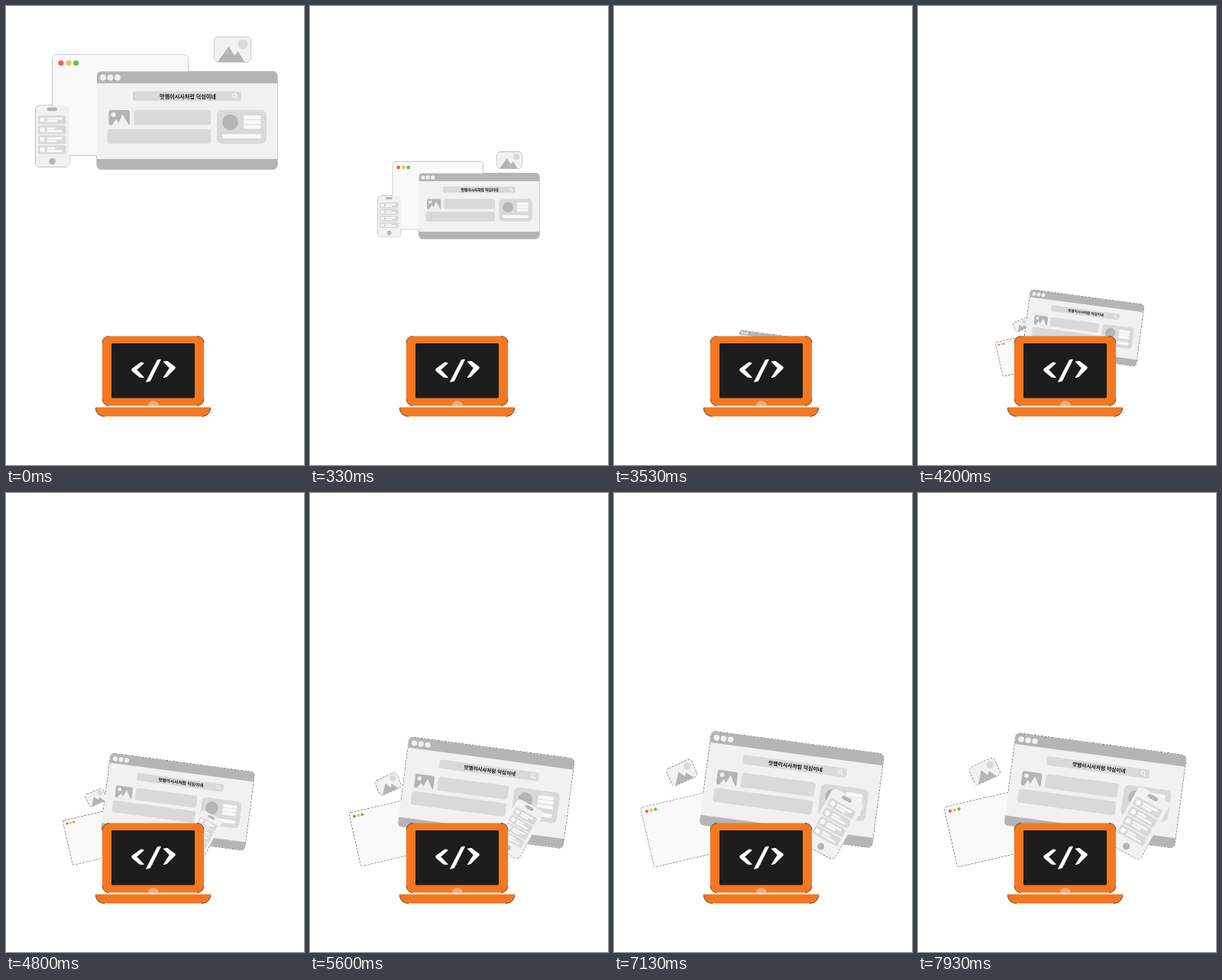
Write an HTML page that moves like this. It is 390 px wide and 600 px high and loops after 8000 ms.

```html
<!DOCTYPE html>
<html lang="ko">
<head>
<meta charset="utf-8">
<title>Laptop and windows</title>
<style>
  html, body { margin: 0; width: 100%; height: 100%; overflow: hidden; background: #fff; }
  svg { display: block; width: 100vw; height: 100vh; }
  #fringe rect, .corner { fill: none; stroke: #222; stroke-width: 1; vector-effect: non-scaling-stroke; }
  #fringe { opacity: .45; }
  #fringe.loose { opacity: .9; stroke-dasharray: 3 1.5; }
  .corner { stroke-width: .7; }
  .pale { fill: #f1f1f1; }
  .mid { fill: #d9d9d9; }
  .dark { fill: #b5b5b5; }
  .white { fill: #fafafa; }
  .query { font: 700 7.1px "Noto Sans CJK KR", "Noto Sans CJK", sans-serif; text-anchor: middle; fill: #151515; }
</style>
</head>
<body>
<svg viewBox="0 0 390 600">
  <!-- thin outlines lie below all fills, so only the joint silhouette shows -->
  <g id="fringe"></g>
  <g id="sheet">
    <rect x="61" y="64" width="177" height="131.500" rx="4" fill="#f9f9f9"/>
    <circle cx="72" cy="74.500" r="3.600" fill="#f0625b"/>
    <circle cx="82" cy="74.500" r="3.600" fill="#f5bf4f"/>
    <circle cx="91.500" cy="74.500" r="3.600" fill="#61c454"/>
  </g>
  <g id="browser">
    <rect class="pale" x="119" y="85.500" width="236" height="128" rx="6"/>
    <path class="dark" d="M119 101V91.500q0-6 6-6H349q6 0 6 6V101zM119 200H355v7.500q0 6-6 6H125q-6 0-6-6z"/>
    <g class="pale">
      <circle cx="127" cy="93.500" r="3.900"/>
      <circle cx="136.500" cy="93.500" r="3.900"/>
      <circle cx="146" cy="93.500" r="3.900"/>
    </g>
    <rect class="mid" x="166" y="111.500" width="142" height="12.500" rx="3"/>
    <g fill="none" stroke="#f8f8f8" stroke-width="1.100">
      <circle cx="299" cy="117" r="2.400"/>
      <path d="M300.800 118.800L303.300 121.500"/>
    </g>
    <text class="query" x="238" y="120.500">맛멤이시사처럼 덕심이네</text>
    <rect class="dark" x="134.500" y="136" width="27.500" height="20" rx="3"/>
    <circle class="pale" cx="140.800" cy="142" r="3"/>
    <path class="pale" d="M138.500 156L144 148L147.500 152.500L152.500 141.500L161 156z"/>
    <rect class="mid" x="167.500" y="136" width="100.500" height="19.500" rx="3"/>
    <rect class="mid" x="133" y="161" width="135" height="19" rx="3"/>
    <rect class="mid" x="276" y="136" width="65" height="44" rx="7"/>
    <circle class="dark" cx="293.500" cy="152" r="10.300"/>
    <g class="white">
      <rect x="311" y="143" width="22.500" height="5.200" rx="1.500"/>
      <rect x="311" y="149.200" width="22.500" height="5.200" rx="1.500"/>
      <rect x="311" y="155.400" width="22.500" height="5.200" rx="1.500"/>
      <rect x="283" y="167.500" width="50.500" height="5.500" rx="1.500"/>
    </g>
  </g>
  <g id="phone">
    <rect class="pale" x="38.500" y="130" width="44.500" height="80.500" rx="6"/>
    <rect class="dark" x="53.500" y="132.500" width="13.500" height="4.800" rx="2.400"/>
    <g id="rows"></g>
    <circle class="dark" cx="60.500" cy="203" r="4.300"/>
  </g>
  <g id="picture">
    <rect class="pale" x="272.500" y="40.500" width="48" height="32.500" rx="5.500"/>
    <circle class="mid" cx="310" cy="50" r="6.500"/>
    <path class="dark" d="M277 73L291.500 53L299 65L303.500 59.500L312.500 73z"/>
  </g>
  <g id="laptop">
    <rect x="126" y="431.500" width="133" height="91" rx="9" fill="#f47721"/>
    <rect x="138" y="441" width="109" height="71.500" rx="1.500" fill="#1c1c1c"/>
    <path d="M186 522.500a7 6.500 0 0 1 14 0z" fill="#f9ad7b"/>
    <path d="M117 524.500H268V526Q266 536.500 256 536.500H129Q119 536.500 117 526z" fill="#f47721"/>
    <path class="corner" d="M126 440.500a9 9 0 0 1 9-9M250 431.500a9 9 0 0 1 9 9M259 513.500a9 9 0 0 1-9 9M135 522.500a9 9 0 0 1-9-9M268 526Q266 536.500 256 536.500M129 536.500Q119 536.500 117 526"/>
    <g fill="#fff" stroke="#fff" stroke-linejoin="round">
      <path d="M177 466L165 474.500V476.500L175 485L180 485.500L170.500 475.500L180 467z" stroke-width="1.200"/>
      <path d="M198.500 463L202 462.500L188.500 489.500L184 491z" stroke-width="1.600"/>
      <path d="M206.500 465L211 464.500L221 472V473.500L210 484.500L206.500 485.500L214.500 473z" stroke-width="1.200"/>
    </g>
  </g>
</svg>
<script>
  const LOOP = 8000, RISE = 3000;
  const get = id => document.getElementById(id);

  get("rows").innerHTML = [143, 156, 169, 182].map((y, i) => `
    <rect class="mid" x="42" y="${y}" width="36.500" height="11.500" rx="2"/>
    <g class="white">
      <circle cx="47.500" cy="${y + 5.7}" r="3.100"/>
      <rect x="53.500" y="${y + 2.7}" width="${i % 2 ? 11 : 20}" height="2.600" rx="1"/>
      <rect x="53.500" y="${y + 6.3}" width="${i % 2 ? 20 : 13}" height="2.600" rx="1"/>
    </g>`).join("");

  // home: resting centre, sink: where it vanishes,
  // from + travel: path of the centre as it rises again
  const parts = [
    { id: "sheet", home: [149.5, 130], sink: [203, 484], from: [187.5, 478], travel: [-92, -40], size: .608, tilt: -13, span: 5000 },
    { id: "browser", home: [237, 149.5], sink: [190, 485], from: [185.5, 484.5], travel: [47, -97], size: .965, tilt: 7.6, span: 4000 },
    { id: "phone", home: [60.5, 170.3], sink: [190, 484], from: [193, 474.6], travel: [97, -43.6], size: 1.07, tilt: 29, span: 6000 },
    { id: "picture", home: [296.5, 56.7], sink: [190, 491], from: [186, 473.6], travel: [-99, -110], size: .75, tilt: -24, span: 5600 }
  ];
  const fringe = get("fringe");
  parts.forEach(p => {
    const art = get(p.id);
    const outline = art.querySelector("rect").cloneNode();
    fringe.append(outline);
    p.nodes = [art, outline];
  });

  const easeOut = u => 1 - (1 - u) ** 3;

  // Out and back again along the same curve
  function riseAt(t, span) {
    const u = Math.max(0, t - RISE) / span;
    return easeOut(u > 1 ? 2 - u : u);
  }

  function place(p, t) {
    const sinking = t < RISE;
    const k = sinking ? Math.max(0, 1 - t / 1000) : riseAt(t, p.span);
    const scale = sinking ? k : p.size * k;
    const at = i => sinking
      ? p.sink[i] + (p.home[i] - p.sink[i]) * k
      : p.from[i] + p.travel[i] * k;
    const move = `translate(${at(0)} ${at(1)}) rotate(${sinking ? 0 : p.tilt}) scale(${scale}) translate(${-p.home[0]} ${-p.home[1]})`;
    for (const node of p.nodes) {
      node.setAttribute("visibility", scale > .001 ? "visible" : "hidden");
      node.setAttribute("transform", move);
    }
  }

  function draw(ms) {
    // 15 pictures per second
    const t = Math.floor((ms % LOOP + 4) * .015) / .015 % LOOP;
    parts.forEach(p => place(p, t));
    fringe.setAttribute("class", t < RISE ? "" : "loose");
  }

  const start = performance.now();
  function tick() {
    draw(performance.now() - start);
    requestAnimationFrame(tick);
  }
  tick();
</script>
</body>
</html>
```
